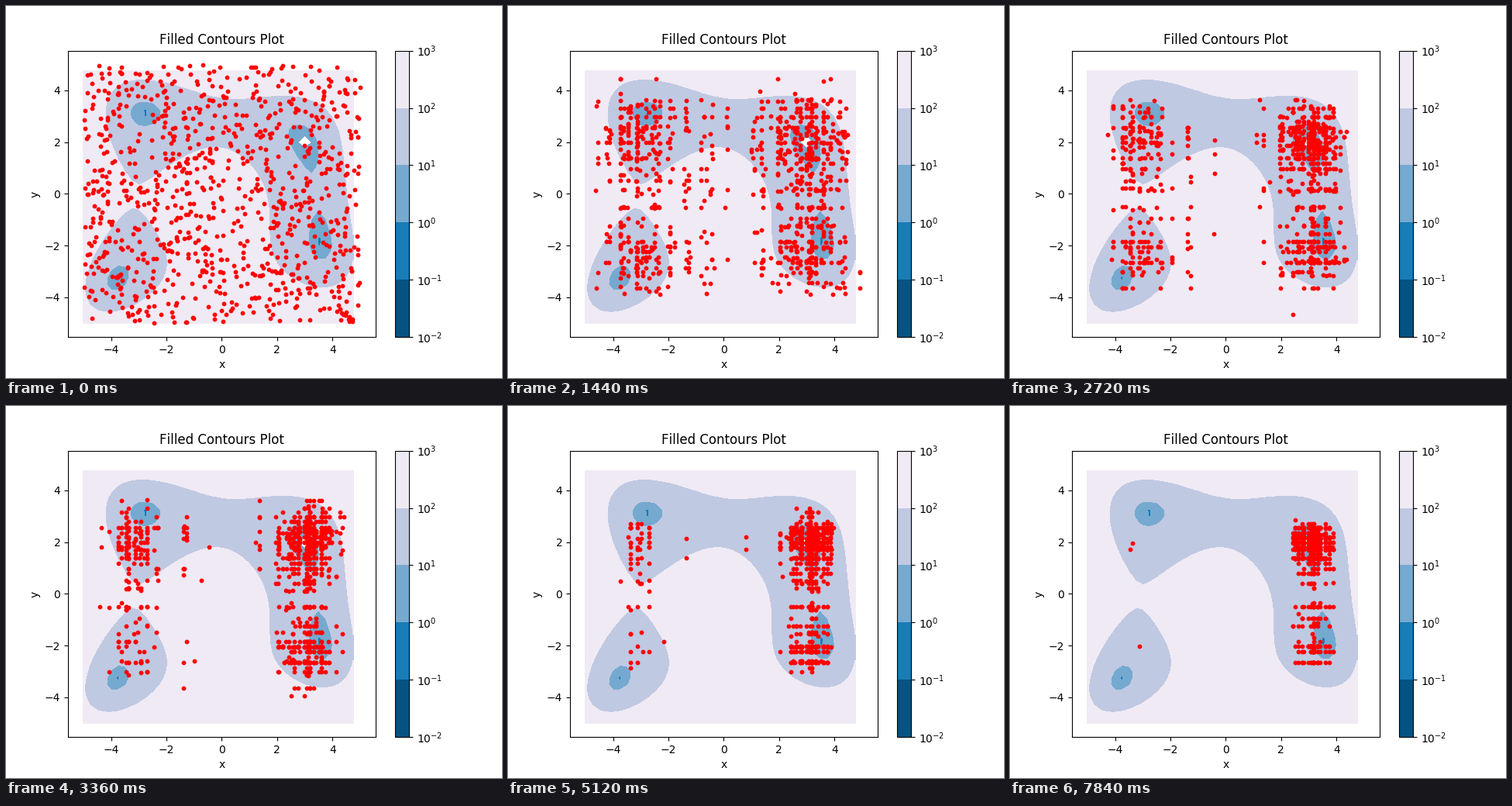
A matplotlib script for the animation above (8000 ms loop, 640 px wide and 480 px high).

```python
import numpy as np
import matplotlib.pyplot as plt
from matplotlib import ticker
from matplotlib.animation import FuncAnimation

STEPS, INTERVAL = 50, 160
SIZE, STRATA, LIMIT = 900, 20, 5
JUMP = 0.004      # mutation rate


def himmelblau(x, y):
    return (x**2 + y - 11)**2 + (x + y**2 - 7)**2


def cost(x, y):
    # a slight tilt makes the basin at (3, 2) win
    return himmelblau(x, y) + 14 * np.maximum(y - 2, 0) + 5 * (y < 0)


def select(genes, weight, rng):
    """Weighted draw, stratified over the sorted genes to limit drift."""
    order = np.argsort(genes)
    total = np.cumsum(weight[order])
    layer = np.arange(SIZE) % STRATA
    spot = (layer + rng.random(SIZE)) / STRATA * total[-1]
    picks = np.minimum(np.searchsorted(total, spot), SIZE - 1)
    return rng.permutation(genes[order[picks]])


def next_generation(pop, step, rng):
    pressure = 0.0022 + 0.00004 * step
    weight = np.exp(-pressure * cost(*pop.T))
    child = np.column_stack([select(genes, weight, rng) for genes in pop.T])
    jumped = np.flatnonzero(rng.random(SIZE) < JUMP)
    axis = rng.integers(0, 2, len(jumped))
    child[jumped, axis] = rng.uniform(-LIMIT, LIMIT, len(jumped))
    return child


def evolve(seed):
    rng = np.random.default_rng(seed)
    history = [rng.uniform(-LIMIT, LIMIT, (SIZE, 2))]
    for step in range(1, STEPS):
        history.append(next_generation(history[-1], step, rng))
    return history


history = evolve(7)

plt.rcParams["text.kerning_factor"] = 6
fig, ax = plt.subplots(figsize=(6.4, 4.8), dpi=100)
grid = np.arange(-LIMIT, LIMIT, 0.25)
X, Y = np.meshgrid(grid, grid)
Z = himmelblau(X, Y)
Z = np.ma.masked_where(Z <= 0, Z)
filled = ax.contourf(X, Y, Z, locator=ticker.LogLocator(), cmap="PuBu_r")
bar = fig.colorbar(filled)
bar.minorticks_off()

ax.set_title("Filled Contours Plot")
ax.set_xlabel("x")
ax.set_ylabel("y")
dots = ax.scatter(*history[0].T, s=10, c="red")
ax.set_xlim(-5.555, 5.555)
ax.set_ylim(-5.535, 5.535)


def draw(step):
    dots.set_offsets(history[step])
    return dots,


anim = FuncAnimation(fig, draw, frames=STEPS, interval=INTERVAL,
                     repeat=True, repeat_delay=0)
plt.show()
```
